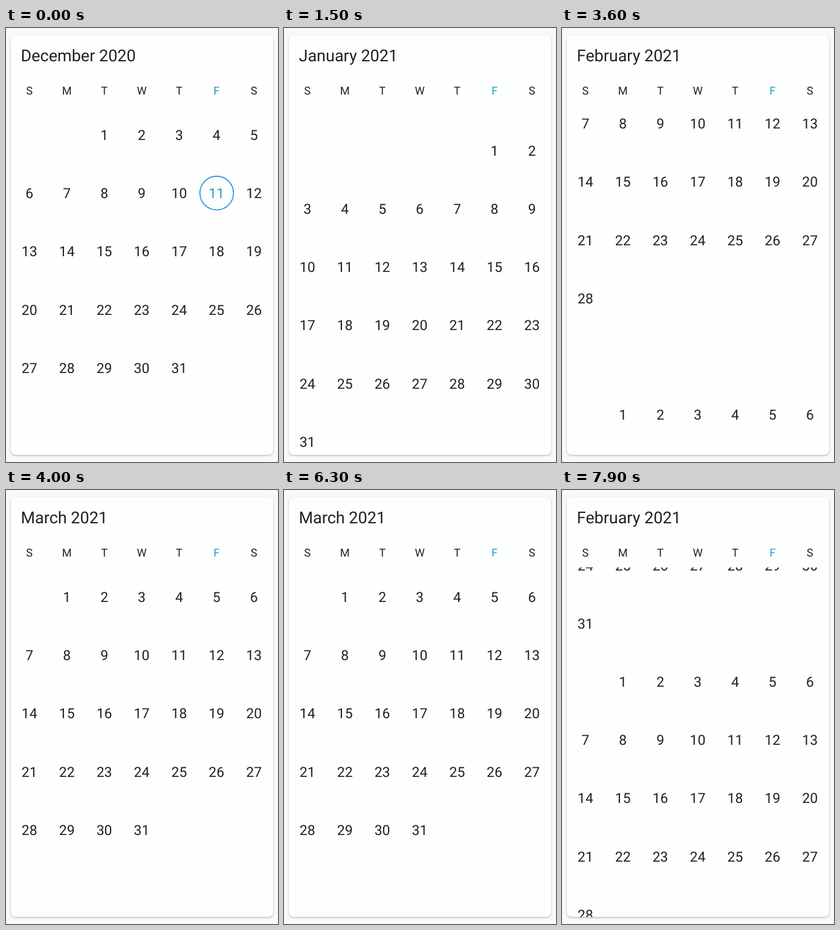
Write an HTML page that moves like this. It is 450x717 px and loops after 8 s.

```html
<!DOCTYPE html>
<html lang="en">
<head>
<meta charset="utf-8">
<title>Scrolling calendar</title>
<style>
  html, body { margin: 0; width: 100%; height: 100%; overflow: hidden; }
  body { animation: tint 8s step-end infinite; }
  svg { display: block; }
  text { font-family: Roboto, sans-serif; fill: #212121; text-rendering: geometricPrecision; }
  .card { fill: var(--card); filter: drop-shadow(0 1px 1.3px rgba(0, 0, 0, .32)); }
  .title { font-size: 27px; }
  .weekday { font-size: 18.3px; text-anchor: middle; }
  .day { font-size: 23px; text-anchor: middle; }
  .today { fill: #2b9ac6; }
  .ring { fill: none; stroke: #2797dc; stroke-width: 1.7; }
  @keyframes tint {
    0% { background: #f9f7fb; --card: #fefefe; }
    13.75%, 100% { background: #f7f9f7; --card: #fdfffc; }
  }
</style>
</head>
<body>
<svg width="450" height="717" viewBox="0 0 450 717">
  <defs>
    <clipPath id="window"><rect x="8" y="128" width="434" height="577.5"/></clipPath>
  </defs>
  <rect class="card" x="8" y="12" width="434" height="693.5" rx="8"/>
  <text class="title" id="title" x="24.5" y="54.6"></text>
  <g id="weekdays"></g>
  <g clip-path="url(#window)"><g id="strip"></g></g>
</svg>
<script>
const LOOP = 8000, TICK = 100;
const PAGE = 577, ROW = PAGE / 6;
const MONTHS = ['December 2020', 'January 2021', 'February 2021', 'March 2021', 'April 2021'];
const TODAY = { month: 0, day: 11 };

const title = document.getElementById('title');
const strip = document.getElementById('strip');
const weekdays = document.getElementById('weekdays');
const columnX = i => 38.8 + 61.9 * i;

function add(parent, tag, attrs, text = '') {
  const node = document.createElementNS('http://www.w3.org/2000/svg', tag);
  for (const name in attrs) node.setAttribute(name, attrs[name]);
  node.textContent = text;
  parent.append(node);
}

[...'SMTWTFS'].forEach((letter, i) => add(weekdays, 'text',
  { class: i === 5 ? 'weekday today' : 'weekday', x: columnX(i), y: 109.6 }, letter));

MONTHS.forEach((_, m) => {
  const first = new Date(Date.UTC(2020, 11 + m, 1)).getUTCDay();
  const count = new Date(Date.UTC(2020, 12 + m, 0)).getUTCDate();
  for (let day = 1; day <= count; day++) {
    const cell = first + day - 1;
    const x = columnX(cell % 7);
    const y = 176.7 + m * PAGE + Math.floor(cell / 7) * ROW;
    const isToday = m === TODAY.month && day === TODAY.day;
    if (isToday) add(strip, 'circle', { class: 'ring', cx: x + .3, cy: y - .1, r: 27.8 });
    add(strip, 'text', { class: isToday ? 'day today' : 'day', x, y: y + 8.3 }, day);
  }
});

// Each swipe starts partway, where the finger lets go, and settles on the next page.
const swipes = [
  { at: 1100, from: 0, to: 1, grab: 108, pause: 1 },
  { at: 2400, from: 1, to: 2, grab: 124 },
  { at: 3600, from: 2, to: 3, grab: 115 },
  { at: 4800, from: 3, to: 4, grab: 140 },
  { at: 5900, from: 4, to: 3, grab: 140 },
  { at: 6800, from: 3, to: 2, grab: 131 },
  { at: 7900, from: 2, to: 1, grab: 140 }
];

function progress(step, grab) {
  const start = grab / PAGE;
  return [start, start + .265, start + .595, .955][step] ?? 1;
}

function positionAt(time) {
  const swipe = swipes.findLast(s => s.at <= time);
  if (!swipe) return 0;
  let step = Math.floor((time - swipe.at) / TICK);
  if (swipe.pause && step > 1) step -= swipe.pause;
  return swipe.from + (swipe.to - swipe.from) * progress(step, swipe.grab);
}

const origin = performance.now();
function draw(now) {
  const position = positionAt(Math.max(0, now - origin) % LOOP);
  const name = MONTHS[Math.round(position)];
  strip.setAttribute('transform', `translate(0 ${-position * PAGE})`);
  if (title.textContent !== name) title.textContent = name;
  requestAnimationFrame(draw);
}
draw(origin);
</script>
</body>
</html>
```
